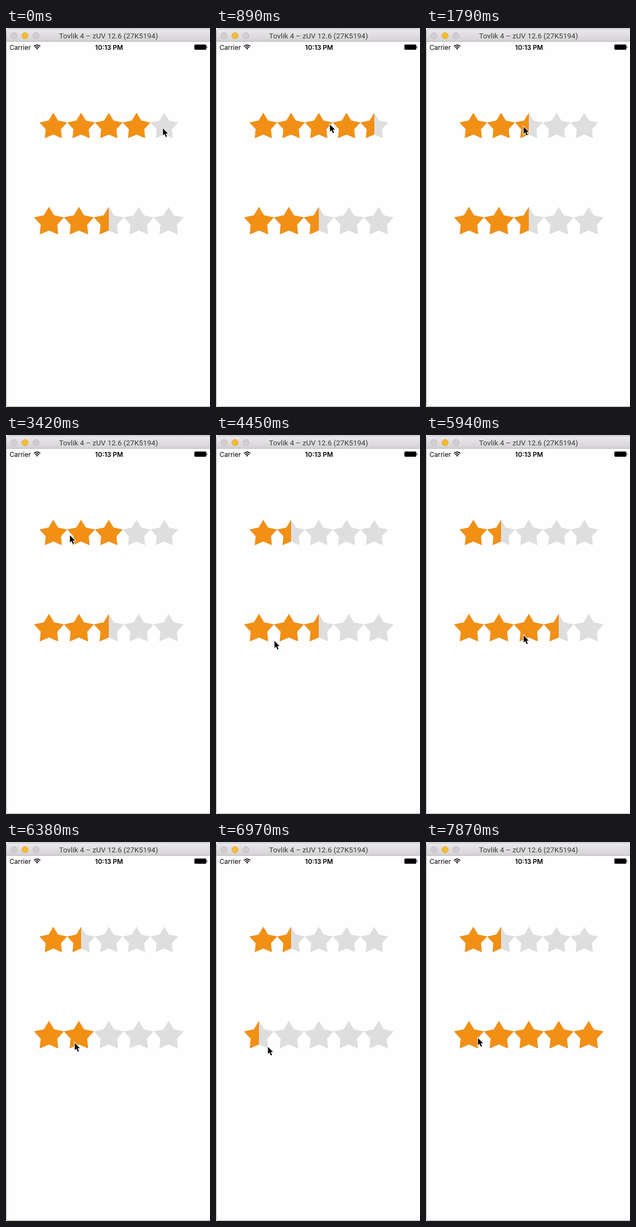
An HTML page for the animation above (8 s loop, 375 px wide and 693 px high).

```html
<!DOCTYPE html>
<html lang="en">
<head>
<meta charset="utf-8">
<title>Star rating</title>
<style>
  html, body { margin: 0; width: 100%; height: 100%; overflow: hidden; background: #fff; }
  svg { display: block; width: 375px; height: 693px; }
  .title { font: 13.5px Roboto, sans-serif; fill: #3c3c3c; }
  .status { font: 12px Inter, sans-serif; fill: #000; }
  .clock { font-weight: 600; }
</style>
</head>
<body>
<svg viewBox="0 0 375 693">
  <defs>
    <linearGradient id="bar" x2="0" y2="1">
      <stop offset="0" stop-color="#ebe9eb"/>
      <stop offset="1" stop-color="#d4d2d4"/>
    </linearGradient>
    <polygon id="star"/>
  </defs>

  <!-- window -->
  <path d="M.5 6Q.5 1.5 5 1.5H380V692.5H5Q.5 692.5 .5 688Z" fill="#fefefe" stroke="#a4a4a4"/>
  <path d="M1 24V6Q1 2 5 2H375V24Z" fill="url(#bar)"/>
  <path d="M1 24.5H375" stroke="#b3b1b3"/>
  <g fill="#d0ced0" stroke="#b5b3b5" stroke-width=".8">
    <circle cx="14.5" cy="14" r="5.7"/>
    <circle cx="35" cy="14" r="5.7" fill="#f6bb2e" stroke="#dc9f26"/>
    <circle cx="55" cy="14" r="5.7"/>
  </g>
  <text class="title" x="188.5" y="19" text-anchor="middle">Tovlik 4 – zUV 12.6 (27K5194)</text>

  <!-- status bar -->
  <text class="status" x="6.5" y="39.5">Carrier</text>
  <text class="status clock" x="189.5" y="39.5" text-anchor="middle">10:13 PM</text>
  <g fill="none" stroke="#000" stroke-width="1.6">
    <path d="M51.4 33.7Q57.2 28.6 63 33.7M53.5 36Q57.2 32.8 60.9 36"/>
    <path d="M55.2 37.2Q57.2 35.6 59.2 37.2L57.2 39.4Z" fill="#000" stroke="none"/>
  </g>
  <rect x="346.3" y="30.3" width="22" height="9.4" rx="1.8"/>
  <path d="M369 33.2Q371.4 35 369 36.8Z"/>

  <g id="rows"></g>
  <path id="cursor" d="M1.5 1.5V14.6L4.5 11.7 6.8 17.3 9 16.4 6.7 11H10.8Z"
        stroke="#fff" stroke-width="2" paint-order="stroke"/>
</svg>
<script>
const LOOP = 8000, TICK = 148.3;   // the picture refreshes once per tick
const LAG = 2;                     // ticks until a drag shows in the stars
const HOTSPOT = 1.4;

// cursor path: tick, x, y
const path = [
  [-2, 250, 182], [0, 287, 182], [3, 311, 182], [6, 208, 175], [9, 188, 174], [10, 178, 179],
  [14, 178, 179], [16, 197, 178], [19, 197, 178], [20, 174, 179], [21, 174, 179], [23, 116, 182],
  [25, 118, 184], [28, 120, 438], [30, 106, 375], [35, 274, 363], [36, 291, 363],
  [41, 150, 365], [43, 125, 366], [46, 29, 376], [51, 352, 361], [53, 94, 357]
];
// tick ranges with the button held down
const drags = [[-2, 19], [22, 25], [30, 53]];

const topRow = { id: "topFill", x: 61.5, y: 155, pitch: 51, height: 46.5, rating: 4 };
const bottomRow = { id: "bottomFill", x: 51.5, y: 327, pitch: 55, height: 50.5, rating: 2.5 };

const rows = document.getElementById("rows");
const cursor = document.getElementById("cursor");

// five-pointed star in a unit box
function starPoints(innerRatio) {
  return Array.from({ length: 10 }, (_, i) => {
    const radius = i % 2 ? innerRatio : 1, angle = i * Math.PI / 5;
    return [.5 + .526 * radius * Math.sin(angle), .553 * (1 - radius * Math.cos(angle))];
  }).join(" ");
}

function buildRow(row) {
  const { id, x, y, pitch, height } = row;
  const stars = [0, 1, 2, 3, 4].map(i =>
    `<use href="#star" transform="translate(${x + i * pitch} ${y}) scale(${pitch} ${height})"/>`).join("");
  rows.insertAdjacentHTML("beforeend", `
    <clipPath id="${id}"><rect x="${x}" y="${y}" height="${height}"/></clipPath>
    <g fill="#dedede">${stars}</g>
    <g fill="#f19015" clip-path="url(#${id})">${stars}</g>`);
  row.fill = rows.querySelector(`#${id} rect`);
}

function cursorAt(tick) {
  const next = Math.max(1, path.findIndex(point => point[0] >= tick));
  const [t0, x0, y0] = path[next - 1], [t1, x1, y1] = path[next];
  const u = (tick - t0) / (t1 - t0);
  return [x0 + (x1 - x0) * u, y0 + (y1 - y0) * u];
}

// replay the drags up to a tick, rounding up to half stars
function showRatings(lastTick) {
  const ratings = new Map([[topRow, topRow.rating], [bottomRow, bottomRow.rating]]);
  for (let tick = -LAG; tick <= lastTick; tick++) {
    if (!drags.some(([from, to]) => tick >= from && tick <= to)) continue;
    const [x, y] = cursorAt(tick);
    const row = y < 250 ? topRow : bottomRow;
    const stars = Math.ceil((x + HOTSPOT - row.x) / row.pitch * 2) / 2;
    ratings.set(row, Math.min(5, Math.max(.5, stars)));
  }
  ratings.forEach((rating, row) => row.fill.setAttribute("width", rating * row.pitch));
}

function draw() {
  const tick = Math.floor(performance.now() % LOOP / TICK);
  cursor.setAttribute("transform", `translate(${cursorAt(tick).map(Math.round).join(" ")})`);
  showRatings(tick - LAG);
  requestAnimationFrame(draw);
}

document.getElementById("star").setAttribute("points", starPoints(.55));
[topRow, bottomRow].forEach(buildRow);
draw();
</script>
</body>
</html>
```
